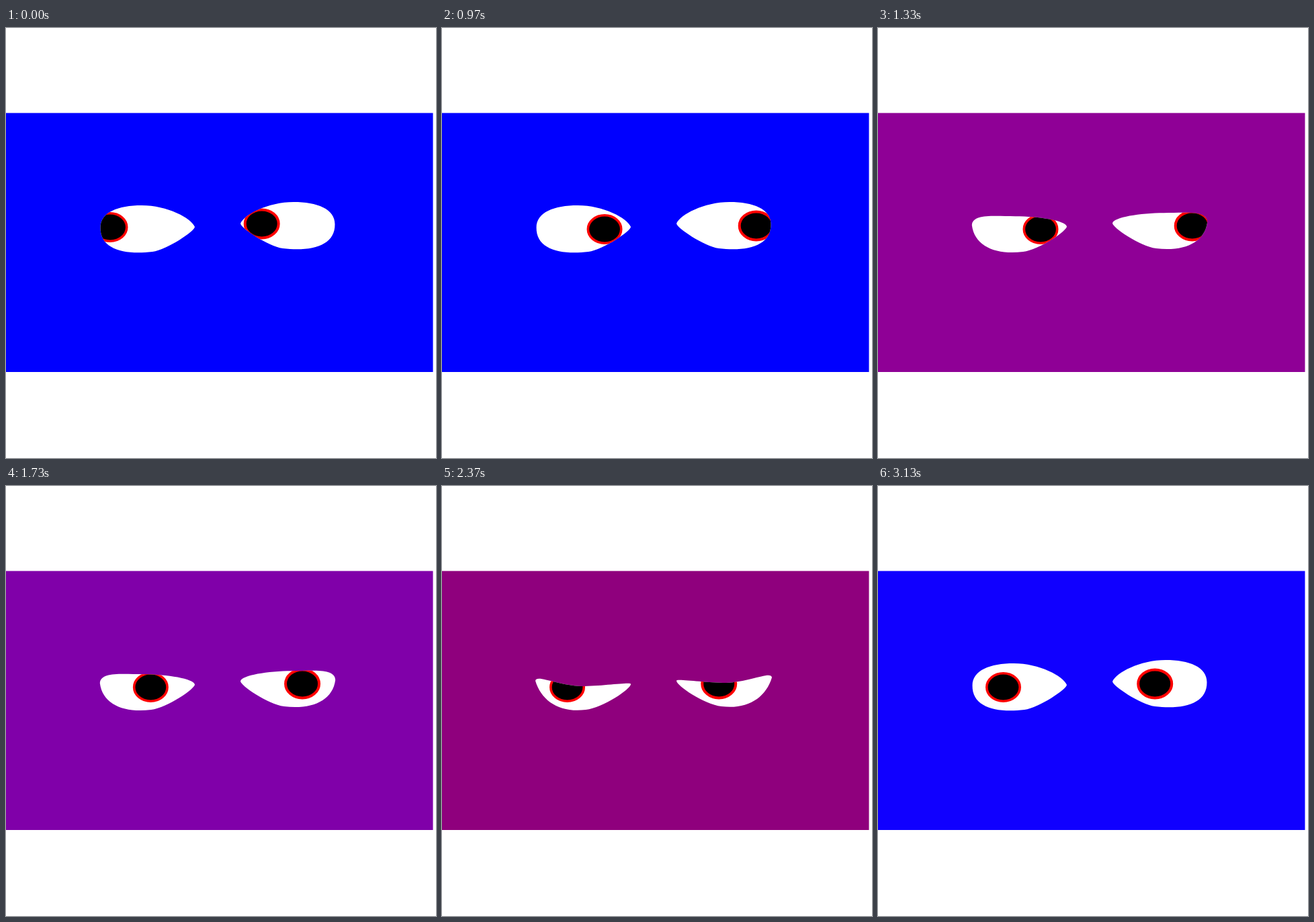
Recreate the animation shown at these times as an HTML page with a canvas. Size 640 px wide and 640 px high, loop 3.16 s.

```html
<!DOCTYPE html>
<html>
<head>
<meta charset="utf-8">
<style>
html, body { margin: 0; width: 100%; height: 100%; overflow: hidden; background: #fff; }
canvas { display: block; }
</style>
</head>
<body>
<canvas id="stage" width="640" height="640"></canvas>
<script>
const ctx = document.getElementById('stage').getContext('2d');
const LOOP = 3160;

// Keyframes: [time, ...values]
const lidKeys = [[1000, 0], [1330, 0.48], [2170, 0.48], [2370, 1], [2630, 0.64], [3100, 0]];
const skyKeys = [
  [1000, 0, 0, 255], [1330, 143, 0, 150], [2170, 112, 0, 190],
  [2370, 144, 0, 125], [2630, 10, 128, 214], [3130, 16, 0, 255]
];

const linear = k => k;
const smooth = k => k * k * (3 - 2 * k);
const progress = (t, from, to) => Math.max(0, Math.min(1, (t - from) / (to - from)));

function at(keys, t, ease) {
  const i = Math.max(1, keys.findLastIndex(key => key[0] <= t) + 1);
  const a = keys[i - 1], b = keys[i] || a;
  const k = a === b ? 0 : ease(progress(t, a[0], b[0]));
  return a.map((v, n) => v + (b[n] - v) * k).slice(1);
}

// Eye outline: k = 0 is wide open, k = 1 is scowling
function eyePath(k) {
  const left = [140.5 - 1.5 * k, 297 - 7 * k];
  const lid = 264 + 34 * k;
  const bottom = [218 - 4 * k, 333];
  ctx.beginPath();
  ctx.moveTo(...left);
  ctx.bezierCurveTo(140.5, 274 + 6 * k, 167 + 5 * k, lid - k, 202 + 5 * k, lid);
  ctx.bezierCurveTo(240, lid, 276 + 7 * k, 283 + 8 * k, 281, 296 - k);
  ctx.bezierCurveTo(281, 302, 240, 330, ...bottom);
  ctx.bezierCurveTo(175, 338, 140 + 8 * k, 329 - 9 * k, ...left);
}

function drawEye(lid, x, y, radius, line, mirrored) {
  ctx.save();
  if (mirrored) ctx.setTransform(-1, 0, 0, 1, 630, -5);
  eyePath(lid);
  ctx.fillStyle = '#fff';
  ctx.fill();
  ctx.clip();
  ctx.resetTransform();
  ctx.beginPath();
  ctx.ellipse(x, y, radius, radius - 4, 0, 0, Math.PI * 2);
  ctx.fillStyle = '#000';
  ctx.fill();
  ctx.strokeStyle = '#f00';
  ctx.lineWidth = line;
  ctx.stroke();
  ctx.restore();
}

function draw(t) {
  ctx.fillStyle = '#fff';
  ctx.fillRect(0, 0, 640, 640);
  ctx.fillStyle = `rgb(${at(skyKeys, t, linear).map(Math.round)})`;
  ctx.fillRect(0, 126.5, 635.5, 385.5);

  const [lid] = at(lidKeys, t, smooth);
  const glance = smooth(progress(t, 0, 960));
  const back = smooth(progress(t, 1400, 2080));
  const x = 155 + 87 * glance - 55.5 * back;
  const y = 296.5 + 3 * glance;
  drawEye(lid, x, y, 24.7, 3.6, false);
  drawEye(lid, x + 225.7, y - 5.1, 25, 4, true);
}

const start = performance.now();
function tick() {
  draw((performance.now() - start) % LOOP);
  requestAnimationFrame(tick);
}
tick();
</script>
</body>
</html>
```
